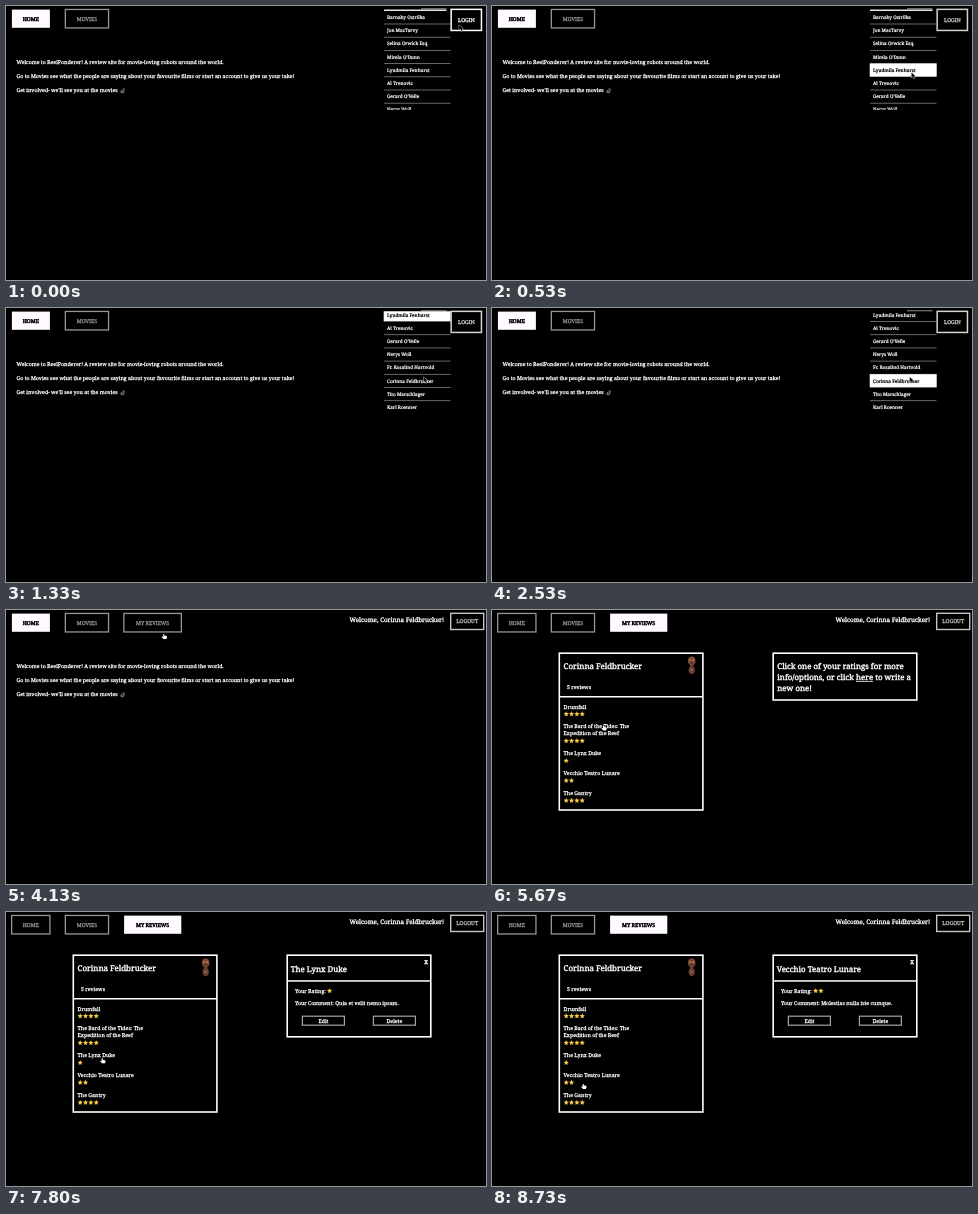
An HTML page with a canvas that plays this animation: 480x274 px, repeating every 9.87 s.

```html
<!DOCTYPE html>
<html lang="en">
<head>
<meta charset="utf-8">
<title>Film reviews</title>
<style>
html, body { margin: 0; width: 100%; height: 100%; overflow: hidden; background: #000; }
canvas { display: block; width: 100vw; height: 100vh; }
</style>
</head>
<body>
<canvas id="stage"></canvas>
<script>
const W = 480, H = 274, LOOP = 9870, STEP = 1000 / 15;
const WHITE = '#fff', PALE = '#fefaff', GRAY = '#959595', GOLD = '#f6c945';
const canvas = document.getElementById('stage');
const ratio = window.devicePixelRatio || 1;
canvas.width = W * ratio;
canvas.height = H * ratio;
const ctx = canvas.getContext('2d');

const USER = 'Corinna Feldbrucker';
const USERS = ['Barnaby Ostrilka', 'Jon MacTarvy', 'Selina Orwick Esq.', "Mirela O'Dunn",
  'Lyudmila Fenhurst', 'Al Trenovic', "Gerard O'Velle", 'Nerys Woll',
  'Fr. Rosalind Hartvold', USER, 'Tito Marschlager', 'Karl Roenner'];
const REVIEWS = [
  { title: ['Drumfall'], stars: 4, y: 98.5 },
  { title: ['The Bard of the Tides: The', 'Expedition of the Reef'], stars: 4, y: 118.2,
    comment: 'Amet non dolorum voluptatum.' },
  { title: ['The Lynx Duke'], stars: 1, y: 145.2, comment: 'Quia et velit nemo ipsam.' },
  { title: ['Vecchio Teatro Lunare'], stars: 2, y: 165, comment: 'Molestias nulla iste cumque.' },
  { title: ['The Gantry'], stars: 4, y: 185 }
];
// Which review is open from which time on
const OPENED = [[6130, 1], [7460, 2], [8660, 3]];
// Pointer legs: start, end, destination
const LEGS = [[200, 730, 419.5, 72], [3130, 3400, 208, 33], [3600, 4130, 158.3, 26.6],
  [5000, 5670, 112, 118], [6530, 7070, 96.8, 148.8], [7930, 8400, 91.8, 174.4]];
// Click rings: start, end, first and last radius
const RINGS = [[6000, 6195, 11, 19], [7330, 7460, 11, 11], [8530, 8725, 11, 19]];

const progress = (t, a, b) => Math.min(1, Math.max(0, (t - a) / (b - a)));
const easeOut = p => 1 - (1 - p) ** 3;
const smoother = p => p ** 3 * (p * (p * 6 - 15) + 10);

// A thin outline gives the regular face a medium weight.
function text(str, x, y, { size = 5.25, color = WHITE, align = 'left', outline = 0.05 } = {}) {
  ctx.font = `${size}px "Noto Serif", serif`;
  ctx.textAlign = align;
  ctx.fillStyle = ctx.strokeStyle = color;
  ctx.lineWidth = size * outline;
  ctx.lineJoin = 'round';
  ctx.fillText(str, x, y);
  ctx.strokeText(str, x, y);
}

function fill(x, y, w, h, color) {
  ctx.fillStyle = color;
  ctx.fillRect(x, y, w, h);
}

function oval(x, y, rx, ry, color) {
  ctx.fillStyle = color;
  ctx.beginPath();
  ctx.ellipse(x, y, rx, ry, 0, 0, 7);
  ctx.fill();
}

function frame(x, y, w, h, color = WHITE, line = 1.6) {
  ctx.strokeStyle = color;
  ctx.lineWidth = line;
  ctx.lineJoin = 'miter';
  ctx.strokeRect(x + line / 2, y + line / 2, w - line, h - line);
}

function button(label, x, y, w, h, color, line = 1.3, baseline = 14.8) {
  frame(x, y, w, h, color, line);
  text(label, x + w / 2, baseline, { align: 'center', color });
}

function tab(label, x, w, active) {
  if (!active) return button(label, x, 2.8, w, 19.8, GRAY);
  fill(x + 0.9, 3.6, w - 1.6, 18.2, PALE);
  text(label, x + w / 2, 14.8, { align: 'center', color: '#000', outline: 0.09 });
}

function stars(count, x, y) {
  ctx.fillStyle = GOLD;
  for (let i = 0; i < count; i++) {
    ctx.beginPath();
    for (let k = 0; k < 10; k++) {
      const r = k % 2 ? 1.3 : 2.75, a = k * Math.PI / 5 - Math.PI / 2;
      ctx.lineTo(x + 2.6 + i * 5.35 + r * Math.cos(a), y + r * Math.sin(a));
    }
    ctx.fill();
  }
}

function userMenu(t, pointer) {
  const top = 4.7, row = 13.2;
  const scroll = 57.3 * smoother(progress(t, 1000, 1333));
  let hovered = t < 1595 ? 4 : 9;
  if (t < 730) hovered = pointer.x < 445 ? Math.floor((pointer.y - 3 - top) / row) : -1;

  fill(415, 2.4, 25.5, 1.1, '#b5b5b5');
  ctx.save();
  ctx.beginPath();
  ctx.rect(377, 3.2, 68, 100.6);
  ctx.clip();
  fill(377, 3.2, 68, 100.6, '#000');
  fill(378, 3.4 - scroll, 62.5, 1.5, WHITE);
  USERS.forEach((name, i) => {
    const y = top + i * row - scroll, on = i === hovered;
    if (on) fill(377.7, y, 67, row, WHITE);
    else if (i < USERS.length - 1) fill(378, y + row - 0.3, 66.5, 0.8, '#808080');
    text(name, 381, y + 8.3, { size: 4.7, color: on ? '#000' : WHITE });
  });
  ctx.restore();
}

function flexedArm(x, y) {
  ctx.strokeStyle = '#777';
  ctx.lineWidth = 1.2;
  ctx.stroke(new Path2D(`M${x + 2.4} ${y - 4}h1.7l-.5 3q-1.4 1.2-2.6 0l.2-1.2 1.4-.2`));
}

function homePage() {
  text('Welcome to ReelPonderer! A review site for movie-loving robots around the world.', 10.5, 57.8);
  text('Go to Movies see what the people are saying about your favourite films or start an account to give us your take!', 10.5, 72.1);
  text("Get involved- we'll see you at the movies", 10.5, 86.4);
  flexedArm(114, 87);
}

function avatar() {
  fill(198.2, 53, 3, 5, '#6a4030');
  oval(199.7, 50.8, 3.8, 4.4, '#7d4934');
  oval(199.7, 60, 3.1, 3.9, '#6a4030');
  fill(197.4, 49.3, 1.4, 1.4, '#c48e66');
  fill(200.6, 49.3, 1.4, 1.4, '#c48e66');
  fill(197.8, 52.6, 3.8, 0.7, '#2a1712');
  fill(198.5, 59, 2.4, 1.5, '#a06a50');
}

function reviewList(showAvatar) {
  frame(66.5, 42.4, 145.2, 158.4);
  fill(67, 86, 144, 1.5, WHITE);
  text(USER, 71.6, 59.3, { size: 7.95 });
  text('5 reviews', 75, 78.8);
  if (showAvatar) avatar();
  for (const { title, stars: count, y } of REVIEWS) {
    title.forEach((line, i) => text(line, 71.6, y + i * 7.1));
    stars(count, 71.6, y + (title.length - 1) * 7.1 + 5.6);
  }
}

function hint() {
  frame(280.4, 42.4, 145.2, 48.4);
  const big = { size: 7.87 };
  const before = 'info/options, or click ';
  text('Click one of your ratings for more', 285.3, 59.4, big);
  text(before, 285.3, 70, big);
  const x = 285.3 + ctx.measureText(before).width;
  text('here', x, 70, big);
  const link = ctx.measureText('here').width;
  fill(x, 71.1, link, 0.7, WHITE);
  text(' to write a', x + link, 70, big);
  text('new one!', 285.3, 80.6, big);
}

function detail({ title, stars: count, comment }) {
  const shift = (title.length - 1) * 10.6;
  frame(280.4, 42.4, 145.2, 83.2 + shift);
  fill(281, 68.2 + shift, 144, 1.5, WHITE);
  title.forEach((line, i) => text(line, 284.8, 59.5 + i * 10.6, { size: 7.87 }));
  text('x', 420.2, 52.4 + shift, { size: 6.6, align: 'center' });
  text('Your Rating:', 289, 80.8 + shift);
  stars(count, 321, 78.9 + shift);
  text(`Your Comment: ${comment}`, 289, 93.3 + shift);
  const y = 103.6 + shift;
  for (const [label, x] of [['Edit', 295.8], ['Delete', 366.8]]) {
    frame(x, y, 43.2, 10.2, '#a5a5a5', 1.2);
    text(label, x + 21.6, y + 6.9, { align: 'center' });
  }
}

function pointerAt(t) {
  let x = 455, y = 22;
  for (const [start, end, toX, toY] of LEGS) {
    const p = easeOut(progress(t, start, end));
    x += (toX - x) * p;
    y += (toY - y) * p;
  }
  return { x, y };
}

const ARROW = new Path2D('M-1.8-3v5.1l1.3-1 .9 2 1.1-.5-.9-1.9h1.6z');
const HAND = new Path2D('M-1.2-2.2q.6-.6 1.1.2l.4 1.1 1.8.3q.8.3.6 1.2l-.6 1.9h-2.9l-1.7-2q0-.9 1-.5l.6.3z');

function drawPointer({ x, y }, hand) {
  ctx.save();
  ctx.translate(x, y);
  ctx.lineWidth = 0.7;
  ctx.lineJoin = 'round';
  ctx.fillStyle = hand ? WHITE : '#000';
  ctx.strokeStyle = hand ? '#222' : WHITE;
  ctx.stroke(hand ? HAND : ARROW);
  ctx.fill(hand ? HAND : ARROW);
  ctx.restore();
}

function clickRing(t, { x, y }) {
  const ring = RINGS.find(([start, end]) => t >= start && t < end);
  if (!ring) return;
  const [start, end, from, to] = ring;
  ctx.strokeStyle = '#444';
  ctx.lineWidth = 0.8;
  ctx.beginPath();
  ctx.arc(x, y, from + (to - from) * progress(t, start, end - STEP), 0, 7);
  ctx.stroke();
}

function draw(t) {
  const loggedIn = t >= 2595, onReviews = t >= 4195;
  const pointer = pointerAt(t);
  ctx.setTransform(canvas.width / W, 0, 0, canvas.height / H, 0, 0);
  ctx.textRendering = 'geometricPrecision';
  fill(0, 0, W, H, '#000');

  tab('HOME', 5, 39.6, !onReviews);
  tab('MOVIES', 58.7, 44.5, false);
  if (loggedIn) {
    tab('MY REVIEWS', 117.2, 58.8, onReviews);
    text(`Welcome, ${USER}!`, 438, 11.8, { size: 6.25, align: 'right' });
    button('LOGOUT', 444, 2.6, 34.4, 17.6, '#c4c4c4', 1.4, 13.3);
  } else {
    userMenu(t, pointer);
    button('LOGIN', 444.4, 2.6, 31.8, 22.6, t < 265 ? WHITE : '#d2d2d2', 1.5, 16);
  }

  if (onReviews) {
    reviewList(t >= 4530);
    const open = OPENED.filter(([start]) => t >= start).pop();
    if (open) detail(REVIEWS[open[1]]);
    else hint();
  } else {
    homePage();
  }
  clickRing(t, pointer);
  drawPointer(pointer, t >= 4060 && t < 5100 || t >= 5600);
}

function tick() {
  const t = performance.now() % LOOP;
  draw(Math.floor((t + 5) / STEP) * STEP);
  requestAnimationFrame(tick);
}
tick();
</script>
</body>
</html>
```
